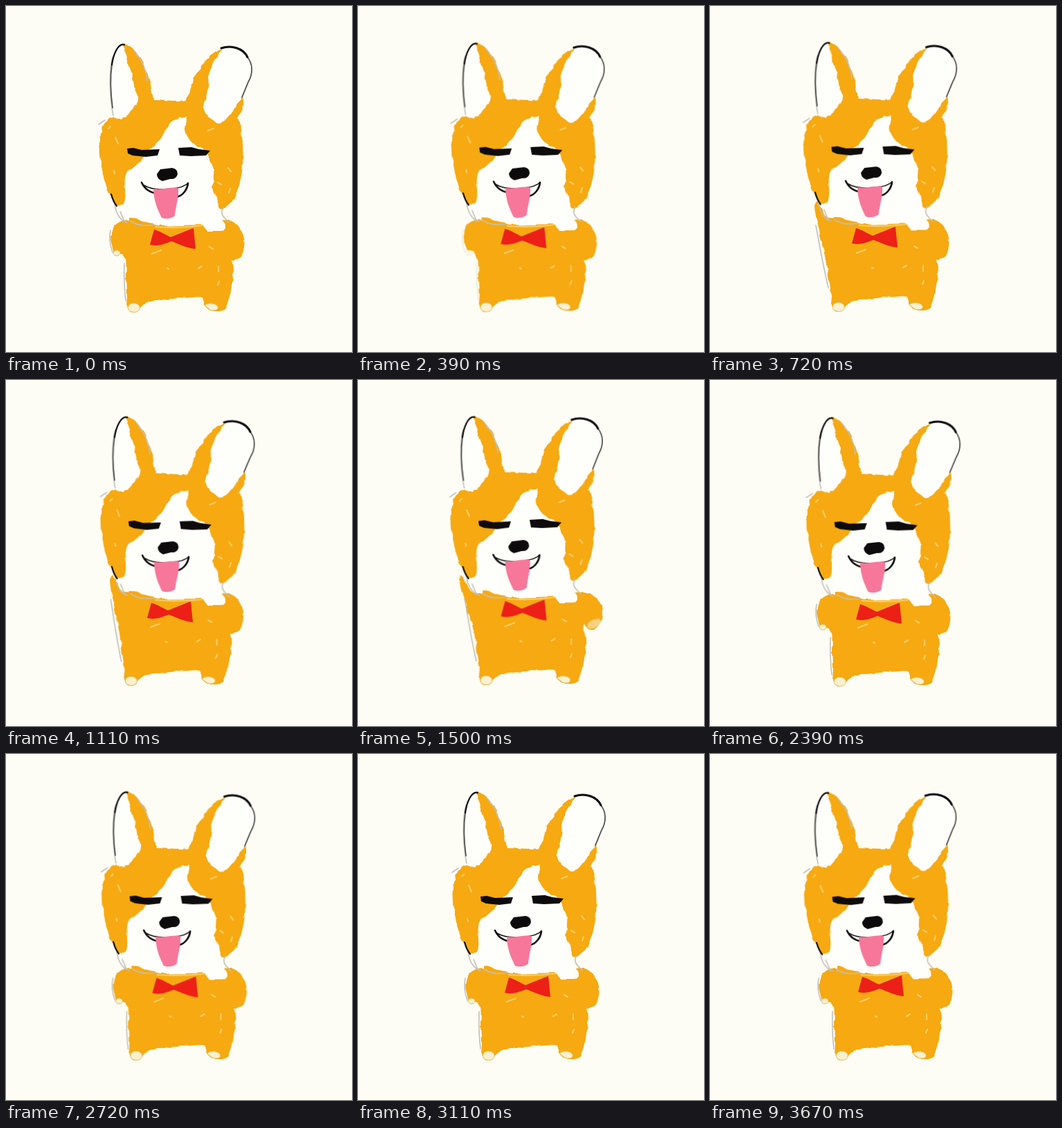
Recreate the animation shown at these times as an HTML page. Size 500 by 500 pixels, loop 3.73 s.

```html
<!DOCTYPE html>
<html lang="en">
<head>
<meta charset="utf-8">
<title>Dancing puppy</title>
<style>
  html, body { margin: 0; width: 100%; height: 100%; overflow: hidden; background: #fdfdf6; }
  svg { display: block; width: 100vw; height: 100vh; }

  .coat { fill: #f6a910; }
  .cream { fill: #fefefa; }
  .paw { fill: #fcf0cf; stroke: #e5b95c; stroke-width: 1; }
  .ink { fill: #0d0b0c; }
  .line { fill: none; stroke: #0d0b0c; stroke-width: 3; stroke-linecap: round; stroke-linejoin: round; }
  .pencil { fill: none; stroke: #c0c0bc; stroke-width: 1.6; stroke-linecap: round; }
  .speck { fill: none; stroke: #f8cc66; stroke-width: 2.2; stroke-linecap: round; }

  .head, .body, .bow, .arm-l, .arm-r, .hand-l, .hand-r, .arm-line {
    animation: 3730ms ease-in-out infinite;
  }
  .head { transform-origin: 230px 265px; animation-name: head; }
  .body { transform-origin: 240px 330px; animation-name: body; }
  .bow { animation-name: bow; }
  .arm-l { animation-name: arm-l; }
  .arm-r { animation-name: arm-r; }
  .hand-l { animation-name: hand-l; }
  .hand-r { animation-name: hand-r; }
  .arm-line { animation-name: arm-line; }

  @keyframes head {
    0%, 100% { transform: translate(0, 0) rotate(0deg); }
    19.3% { transform: translate(0, -2px) rotate(.4deg); }
    29.76% { transform: translate(1px, -1px) rotate(.9deg); }
    50.67% { transform: translate(-2px, -4.5px) rotate(-1.9deg); }
    64.08% { transform: translate(4px, 0) rotate(.7deg); }
    83.38% { transform: translate(2px, 0) rotate(0deg); }
    98.39% { transform: translate(2px, 0) rotate(-.5deg); }
  }
  @keyframes body {
    0%, 100% { transform: translate(0, 0) skewX(0deg); }
    19.3% { transform: translate(1px, -1px) skewX(0deg); }
    29.76% { transform: translate(-1px, -1px) skewX(-1.6deg); }
    50.67% { transform: translate(5px, -3px) skewX(0deg); }
    64.08% { transform: translate(3px, 0) skewX(0deg); }
    83.38% { transform: translate(4px, 0) skewX(0deg); }
    98.39% { transform: translate(6px, 0) skewX(0deg); }
  }
  @keyframes bow {
    0%, 100% { transform: translate(0, 0); }
    19.3% { transform: translate(-3px, -2px); }
    29.76% { transform: translate(-4px, -1px); }
    50.67% { transform: translate(1px, -6px); }
    64.08% { transform: translate(3px, 1px); }
    83.38% { transform: translate(4px, 0); }
    98.39% { transform: translate(6px, -1px); }
  }
  @keyframes arm-l {
    0%, 8%, 63%, 100% { d: path("M176 309C160 310 148 325 152 340C154 352 155 360 160 360C166 356 172 358 174 370L176 420L200 420L200 320Z"); }
    18%, 31% { d: path("M178 306C168 312 162 298 153 282C147 284 151 300 156 322C161 345 165 360 167 374L175 420L200 420L200 320Z"); }
    50.67%, 53% { d: path("M177 313C161 317 147 303 138 285C132 287 139 308 148 325C158 343 165 358 168 375L176 420L200 420L200 320Z"); }
  }
  @keyframes arm-r {
    0%, 31%, 63%, 100% { d: path("M312 310C327 306 340 318 344 335C346 350 342 364 333 367C326 369 322 364 320 358L312 372L300 372L300 320Z"); }
    48%, 53% { d: path("M312 309C325 307 346 309 355 321C361 333 358 351 346 358C338 361 331 357 329 350L322 372L300 372L300 320Z"); }
  }
  @keyframes hand-l {
    0%, 8%, 63%, 100% { opacity: 1; }
    12%, 59% { opacity: 0; }
  }
  @keyframes hand-r {
    0%, 31%, 63%, 100% { transform: translate(-16px, 10px); opacity: 0; }
    48%, 53% { transform: translate(0, 0); opacity: 1; }
  }
  @keyframes arm-line {
    0%, 14%, 58%, 100% { opacity: 0; }
    18%, 53% { opacity: 1; }
  }
</style>
</head>
<body>
<svg viewBox="0 0 500 500">
  <defs>
    <filter id="rough" x="-10%" y="-10%" width="120%" height="120%" color-interpolation-filters="sRGB">
      <feTurbulence type="fractalNoise" baseFrequency=".07" numOctaves="2" seed="4"/>
      <feDisplacementMap in="SourceGraphic" scale="6" xChannelSelector="R" yChannelSelector="G"/>
    </filter>
  </defs>

  <g class="body">
    <path class="pencil arm-line" d="M152 318C157 345 162 375 170 408" stroke-width="1"/>
    <path class="pencil hand-l" d="M151 324Q148 340 154 356M171 372Q170 400 173 426"/>
    <g class="coat" filter="url(#rough)">
      <path d="M178 306L174 360C172 385 177 412 174 432C176 444 191 446 199 432C215 422 230 424 250 421C265 423 280 418 286 422L286 434C292 441 308 443 315 439C325 431 324 412 327 400C329 385 328 372 324 360L325 312Z"/>
      <path class="arm-l" d="M176 309C160 310 148 325 152 340C154 352 155 360 160 360C166 356 172 358 174 370L176 420L200 420L200 320Z"/>
      <path class="arm-r" d="M312 310C327 306 340 318 344 335C346 350 342 364 333 367C326 369 322 364 320 358L312 372L300 372L300 320Z"/>
    </g>
    <ellipse class="paw hand-l" cx="160" cy="357" rx="5" ry="4"/>
    <path class="paw hand-r" d="M336 352C338 345 350 341 355 343C357 349 350 357 343 357C339 358 336 356 336 352Z"/>
    <path class="paw" d="M177 433C180 428 190 428 193 434C195 440 188 444 182 442C178 441 175 438 177 433Z"/>
    <path class="paw" d="M287 433C291 428 303 429 306 434C308 440 300 441 295 439Z"/>
    <path class="speck" d="M211 358L224 353M278 379L283 376M307 376V384M308 398L306 403M233 379L235 380M294 348L299 351"/>
  </g>

  <path class="bow" fill="#ec2016" d="M208 345L214 323C222 325 231 331 238 334C248 330 262 324 271 321L274 351C262 350 250 344 239 340C230 343 222 348 208 345Z"/>

  <g class="head">
    <g filter="url(#rough)">
      <path class="coat" d="M155 161C143 163 137 175 136 195C134 220 140 250 148 268C152 280 158 288 163 290L240 300L316 292C328 286 335 270 339 250C344 230 344 190 337 167L333 163C342 153 345 143 342 131L312 61C300 64 286 81 278 94C268 108 265 125 260 137C245 140 228 136 213 136C208 125 209 108 203 95C196 75 184 58 169 54Z"/>
      <path class="cream" d="M155 160C149 130 150 85 157 67C161 58 165 55 169 56C174 73 183 98 186 120C191 132 193 137 184 146C179 155 177 161 169 160C165 164 159 161 155 160Z"/>
      <path class="cream" d="M312 61C335 55 352 70 355 92C353 112 345 122 340 134C331 142 330 152 321 161C313 169 307 172 298 164C290 160 284 152 286 140C291 128 294 113 292 101C297 85 304 70 312 61Z"/>
      <path class="cream" d="M262 161C247 161 239 165 232 177C225 190 213 204 196 221C186 233 173 238 172 250C170 264 175 272 170 286L161 290C166 300 176 300 182 302C187 309 198 312 212 314L218 318L284 316L291 326L311 326C321 319 317 314 310 305C305 295 311 289 305 278C298 267 296 262 301 253C298 246 303 240 298 230C293 216 290 209 277 203C266 196 259 185 259 176Z"/>
    </g>
    <path class="speck" d="M158 190L162 199M156 238L157 242M292 180L300 177M321 234L325 239M324 264L322 270M306 255L311 258M148 177L151 174M216 319Q250 322 284 317"/>
    <path class="pencil" d="M155 158C149 130 149 90 154 74M184 63C197 78 203 93 204 108M134 171L143 165M157 286C159 302 167 311 175 313M165 297L171 311M180 311Q194 320 214 316M341 132L349 112"/>
    <path class="pencil" stroke-width="4" d="M314 291C308 303 317 306 322 313"/>
    <path class="line" style="stroke:#55534f;stroke-width:1.8" d="M153 85C150 105 151 125 154 147M349 74C357 84 357 98 350 110L341 132"/>
    <path class="line" style="stroke-width:2.2" d="M171 56C162 53 155 70 153 85M152 272Q155 283 160 289"/>
    <path class="line" d="M311 61C326 56 343 61 349 74"/>

    <path class="ink" d="M175 206L184 205L196 208L222 207L219 216L202 218L183 216L176 213Z"/>
    <path class="ink" d="M249 205L268 204L279 207L295 209L289 216L267 217L251 216Z"/>
    <path class="ink" d="M223 236L240 234Q248 235 248 243Q246 251 237 250L226 253Q218 250 218 243Z"/>
    <path class="line" style="stroke-width:2.6" d="M196 255C201 266 209 270 219 271M263 256C262 266 255 274 247 276"/>
    <path class="line" style="stroke-width:1.6" d="M199 259C209 265 225 266 240 264C250 263 258 261 263 256"/>
    <path fill="#f7779a" d="M213 264C225 266 237 261 249 263C250 277 245 290 244 303C238 308 230 308 225 306C220 295 214 285 213 264Z"/>
  </g>
</svg>
</body>
</html>
```
